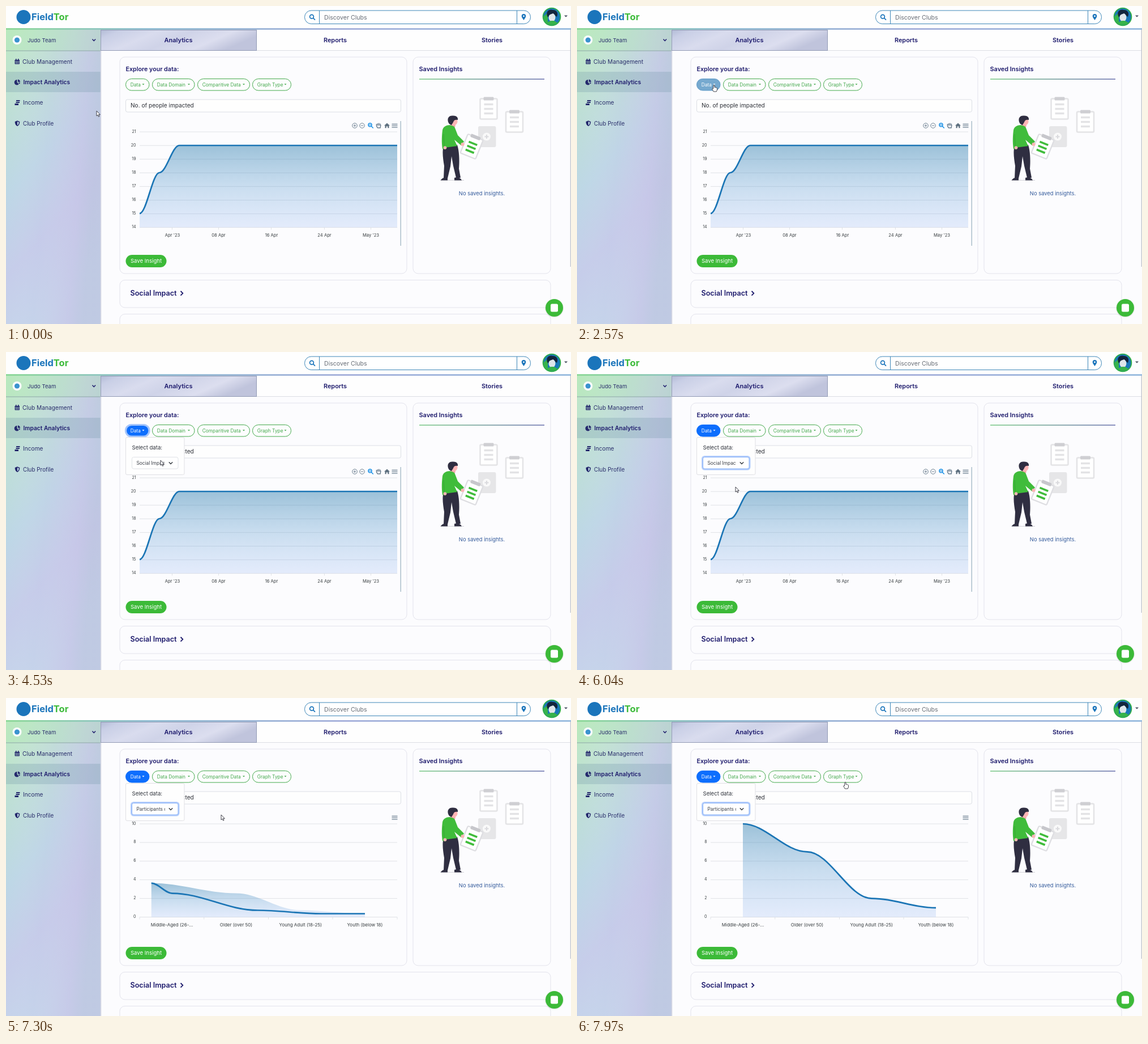
Write an HTML page that moves like this. It is 998 px wide and 561 px high and loops after 8 s.

```html
<!DOCTYPE html>
<html lang="en">
<head>
<meta charset="utf-8">
<title>Impact analytics</title>
<style>
  html, body { margin: 0; width: 100%; height: 100%; overflow: hidden; background: #fcfcfe; }
  svg { display: block; width: 998px; height: 561px; }
  text { font: 10.2px Inter, "Open Sans", sans-serif; fill: #2a2f6b; }
  .bold { font-weight: 600; fill: #1d1a6c; }
  .mid { text-anchor: middle; }
  .pill text { font-size: 8.3px; fill: #43a94b; }
  .pill rect { fill: #fdfdfe; stroke: #43a94b; }
  .pill path { fill: #43a94b; }
  .axis text { font-size: 7.6px; fill: #373d3f; }
  .axis .y { font-size: 7px; text-anchor: end; }
  .axis .cat { font-size: 8px; }
  .axis path { fill: none; stroke: #e0e2e6; }
  .card { fill: #fcfcfe; stroke: #e3e3ec; }
  .line { fill: none; stroke: #1b75b5; stroke-width: 2.7; }
  .tool { fill: none; stroke: #6e8192; }
  .on rect { stroke: none; }
  .on text { fill: #fff; }
  .on path { fill: #fff; }
</style>
</head>
<body>
<svg viewBox="0 0 998 561">
  <defs>
    <linearGradient id="bar"><stop stop-color="#8fd99a"/><stop offset=".25" stop-color="#94bfd4"/><stop offset=".6" stop-color="#a9b3dc"/><stop offset="1" stop-color="#9dbfe0"/></linearGradient>
    <linearGradient id="side" x2=".35" y2="1"><stop stop-color="#bfe9c4"/><stop offset=".2" stop-color="#bce0d0"/><stop offset=".5" stop-color="#b9d5e4"/><stop offset=".75" stop-color="#c1c9e8"/><stop offset="1" stop-color="#c0d4e9"/></linearGradient>
    <linearGradient id="sheen" x2="1" y2=".25"><stop stop-color="#fff" stop-opacity="0"/><stop offset=".5" stop-color="#d4d2ee" stop-opacity=".25"/><stop offset=".85" stop-color="#c9c6e8" stop-opacity=".7"/><stop offset="1" stop-color="#bfc3df" stop-opacity=".6"/></linearGradient>
    <linearGradient id="tab" x2="1" y2=".3"><stop stop-color="#b3bbd6"/><stop offset=".12" stop-color="#c9cfe6"/><stop offset=".35" stop-color="#d9dcee"/><stop offset=".55" stop-color="#cfd3e8"/><stop offset=".8" stop-color="#dcdeef"/><stop offset="1" stop-color="#c0c4dc"/></linearGradient>
    <linearGradient id="rule"><stop stop-color="#6cc47a"/><stop offset="1" stop-color="#5b63a5"/></linearGradient>
    <linearGradient id="area" x2="0" y2="1"><stop stop-color="#2b7cac" stop-opacity=".46"/><stop offset=".5" stop-color="#5d9cd0" stop-opacity=".32"/><stop offset="1" stop-color="#9dbcf4" stop-opacity=".26"/></linearGradient>
    <clipPath id="avatarClip"><circle cx="964" cy="19" r="14.5"/></clipPath>
    <clipPath id="optionClip"><rect x="225" y="186" width="56" height="20"/></clipPath>
    <g id="sheet">
      <rect x="-15" y="-17" width="30" height="36" rx="2" fill="#fff" stroke="#e4e4e6" stroke-width="2.6"/>
      <path d="M-8-7H8M-8 1H8M-8 9H8" stroke="#e3e3e5" stroke-width="3.4"/>
      <rect x="-9" y="-20" width="18" height="6" rx="1.5" fill="#cfcfd3"/>
    </g>
  </defs>

  <rect width="998" height="561" fill="#fcfcfe"/>

  <!-- header -->
  <rect width="998" height="39" fill="#fefefe"/>
  <circle cx="31" cy="19.5" r="12.5" fill="#1b75bb"/>
  <text x="45" y="25" style="font-size:16.5px;font-weight:700;fill:#1b75bb">Field<tspan fill="#3dbb3b">Tor</tspan></text>
  <g fill="#fff" stroke="#3c86b8">
    <rect x="527.5" y="8" width="399" height="23.5" rx="11.7"/>
    <path d="M553.5 8V31.5M902.5 8V31.5"/>
  </g>
  <g fill="none" stroke="#1b75bb" stroke-width="1.7"><circle cx="540" cy="18.7" r="3.4"/><path d="M542.5 21.2L546 24.6"/></g>
  <path d="M914.5 25C912 21.500 910.700 19.700 910.700 17.800A3.800 3.800 0 0 1 918.300 17.800C918.300 19.700 917 21.500 914.500 25Z" fill="#1b75bb"/>
  <circle cx="914.5" cy="17.800" r="1.400" fill="#fff"/>
  <text x="562" y="23.500" style="font-size:10.600px;fill:#666c75">Discover Clubs</text>
  <circle cx="964" cy="19" r="16.300" fill="#2fae45"/>
  <g clip-path="url(#avatarClip)">
    <rect x="948" y="3" width="32" height="32" fill="#1977b8"/>
    <path d="M948 20L957 12V35H948Z" fill="#37b34a"/>
    <ellipse cx="964.500" cy="20" rx="6" ry="7.500" fill="#dfe6ea"/>
    <path d="M954 35C955 28 960 26 965 26S975 29 976 35Z" fill="#37b34a"/>
    <path d="M956 18C953 8 961 5 966 7C973 7 976 13 973 19C970 18 969 14 966 13C963 15 959 14 958 20Z" fill="#14263d"/>
  </g>
  <path d="M986 16.500H992L989 19.700Z" fill="#4e5665"/>

  <!-- sidebar -->
  <rect y="42" width="167" height="519" fill="url(#side)"/>
  <rect y="42" width="167" height="519" fill="url(#sheen)"/>
  <rect y="42" width="167" height="37" fill="#a6e6a8" opacity=".25"/>
  <rect y="116" width="167" height="36" fill="#6f94a5" opacity=".27"/>
  <path d="M0 79H167" stroke="#8ea7a8"/>
  <path d="M167.500 42V561" stroke="#d5d6e3" stroke-width="1.600"/>
  <circle cx="19.500" cy="60" r="8" fill="#fff"/><circle cx="19.500" cy="60" r="4.600" fill="#3b93cf"/>
  <text x="38" y="63.500" style="font-size:9.600px">Judo Team</text>
  <path d="M152.500 58.500L155.300 61.500L158.100 58.500" fill="none" stroke="#1d1a6c" stroke-width="1.500"/>
  <g fill="#25296d">
    <path d="M15.500 95H24V101.500Q24 102.500 23 102.500H16.500Q15.500 102.500 15.500 101.500ZM17 93H18.500V95H17ZM21 93H22.500V95H21Z"/>
    <path d="M19.500 130V134.500L22.700 138A4.700 4.700 0 1 1 19.500 130ZM21 129.400A4.700 4.700 0 0 1 25 134H21ZM21.500 135H25Q24.800 136.500 23.700 137.500Z"/>
    <path d="M18 166H24.500V168H18ZM17.500 169H24V171H17.500ZM15.500 172H22V175H15.500Z"/>
    <path d="M20 202.300L24.300 204C24.300 208 23 210.500 20 212C17 210.500 15.700 208 15.700 204Z"/>
  </g>
  <path d="M15.500 97.500H24M18.300 98V102M21.200 98V102M15.500 100H24" stroke="#bde0d0" stroke-width=".6"/>
  <path d="M20 204V210.300C21.800 209.300 22.700 207.500 22.800 205Z" fill="#bcd6e3"/>
  <text x="29" y="101.500">Club Management</text>
  <text x="30.500" y="138" class="bold">Impact Analytics</text>
  <text x="30" y="174.200">Income</text>
  <text x="30" y="210.500" style="font-size:9.900px">Club Profile</text>

  <!-- tabs -->
  <rect x="443" y="42" width="555" height="36" fill="#fefefe"/>
  <path d="M443 78.500H998" stroke="#dcdde4"/>
  <rect x="167.500" y="42.500" width="275" height="36" fill="url(#tab)" stroke="#939bb5"/>
  <rect y="39" width="998" height="3" fill="url(#bar)"/>
  <g class="mid" style="font-size:11px">
    <text x="304.500" y="64" class="bold" style="font-size:11px">Analytics</text>
    <text x="581.500" y="64" class="bold" style="font-size:10.900px">Reports</text>
    <text x="858.500" y="64" class="bold" style="font-size:10.900px">Stories</text>
  </g>

  <!-- cards -->
  <rect class="card" x="201" y="90" width="507" height="382" rx="9"/>
  <rect class="card" x="719" y="90" width="243" height="382" rx="9"/>
  <rect class="card" x="201" y="483.500" width="761" height="48.500" rx="9"/>
  <rect class="card" x="201" y="543.500" width="761" height="60" rx="9"/>
  <path d="M997.300 42V460" stroke="#c5c8d0" stroke-width="1.400"/>
  <text x="211.500" y="115.400" class="bold" style="font-size:10.700px">Explore your data:</text>
  <text x="729.500" y="115.400" class="bold" style="font-size:10.900px">Saved Insights</text>
  <rect x="730" y="128.300" width="221" height="1.400" fill="url(#rule)"/>
  <text x="219.500" y="511.300" class="bold" style="font-size:12.600px">Social Impact</text>
  <path d="M308.500 503L312.300 506.800L308.500 510.600" fill="none" stroke="#1d1a6c" stroke-width="1.800"/>
  <g id="pills"></g>
  <rect x="211.500" y="165" width="486" height="22" rx="3" fill="#fefefe" stroke="#dcdfe5"/>
  <text x="220" y="179" style="fill:#2c2f36;font-size:10.100px">No. of people impacted</text>
  <rect x="211.500" y="439" width="72" height="22" rx="11" fill="#3cba38"/>
  <text x="247.500" y="453.400" class="mid" style="fill:#fff;font-size:9.600px">Save Insight</text>

  <!-- empty-state illustration -->
  <use href="#sheet" x="852.500" y="180.500"/>
  <use href="#sheet" x="898" y="203.500"/>
  <rect x="834" y="212" width="31.500" height="37" rx="3" fill="#e6e6e8"/>
  <circle cx="849" cy="230.500" r="7" fill="#fff" opacity=".75"/>
  <path d="M845.500 230.500H852.500M849 227V234" stroke="#dadade" stroke-width="2"/>
  <path d="M767 307.500H809" stroke="#d4d4da"/>
  <g fill="#2f2e41">
    <path d="M773 246L797 245C801 257 801 275 800 287L803 303H795L790 282L787 265L785 283L780 304H773L774 282C772 270 770 257 773 246Z"/>
    <path d="M768 307C770 303 775 302 780 303V307.500H768ZM792 307.500V303C798 301 803 303 805 307.500Z"/>
  </g>
  <path d="M786 203L795 205L793 214L785 213Z" fill="#f4a9ab"/>
  <circle cx="791" cy="204" r="6.500" fill="#ffb6b6"/>
  <path d="M780.500 202C780 196 784 193 789 193.500C795 193 799 196 798 201C794 200 791 201 790 205L787 210C783 209 781 206 780.500 202Z" fill="#2f2e41"/>
  <path d="M784 210C788 211 792 212 793 215L798 228L809 239L804 246L792 236L797 247L774 250L777 253L771 252C769 240 770 227 771 219C772 213 778 210 784 210Z" fill="#40bc3b"/>
  <path d="M773 226L774 247" stroke="#35a532" stroke-width="1"/>
  <circle cx="775.500" cy="250" r="2.800" fill="#ffb6b6"/>
  <g transform="translate(823 247) rotate(22)">
    <rect x="-14.500" y="-17" width="29" height="36" rx="2" fill="#fff" stroke="#dedee2" stroke-width="2.300"/>
    <path d="M-8-5H8M-8 2.500H8M-8 10H8" stroke="#40bc3b" stroke-width="3.600"/>
    <rect x="-9" y="-20" width="18" height="6" rx="1.500" fill="#c7c7cc"/>
  </g>
  <circle cx="806.500" cy="244" r="3" fill="#ffb6b6"/>
  <text x="840.500" y="333.600" class="mid" style="font-size:9.400px;fill:#335a9b">No saved insights.</text>

  <!-- charts -->
  <g id="timeChart">
    <g class="axis" id="timeAxis"></g>
    <path id="timeArea" fill="url(#area)"/>
    <path id="timeLine" class="line"/>
    <path d="M697.200 203V423" stroke="#a5b9c8" stroke-width="1.400"/>
    <g class="tool">
      <circle cx="616" cy="211" r="4.300"/><path d="M613.700 211H618.300M616 208.700V213.300"/>
      <circle cx="629" cy="211" r="4.300"/><path d="M626.700 211H631.300"/>
      <g stroke="#168fe6" stroke-width="1.500"><circle cx="643" cy="209.700" r="3"/><path d="M645.200 212L648.700 215.500M641.500 209.700H644.500"/></g>
      <path d="M654.500 212V208M656.500 211V207M658.700 211V206.500M661 211V207.500M654.500 212L656.500 215H661L662 209.500" stroke-width="1.500"/>
    </g>
    <path d="M668 211L673 206.500L678 211H676.500V215.300H674.200V212.200H671.800V215.300H669.500V211Z" fill="#5f7180"/>
  </g>
  <g id="ageChart">
    <g class="axis" id="ageAxis"></g>
    <path id="ageArea" fill="url(#area)"/>
    <path id="ageLine" class="line"/>
  </g>
  <path class="tool" d="M681.500 208.300H691.500M681.500 211.200H691.500M681.500 214.100H691.500" stroke-width="1.200"/>

  <!-- data menu -->
  <g id="menu">
    <rect x="211.500" y="150.500" width="103.500" height="66" rx="2.500" fill="#fefefe" stroke="#e0e0e4"/>
    <text x="222.500" y="171.500" style="font-size:9.600px;fill:#30343c">Select data:</text>
    <rect id="selectRing" x="221.500" y="184.500" width="83.500" height="22.500" rx="4" fill="none" stroke="#b4cdfb" stroke-width="3"/>
    <rect id="selectBox" x="222.500" y="185.500" width="81.500" height="20.500" rx="3" fill="#fff"/>
    <text id="option" x="230.500" y="198.800" clip-path="url(#optionClip)" style="font-size:8.300px;fill:#3b3f47"/>
    <path d="M287.800 194.300L291 197.500L294.200 194.300" fill="none" stroke="#343a40" stroke-width="1.400"/>
  </g>

  <circle cx="968.500" cy="533" r="16.500" fill="#000" opacity=".07"/>
  <circle cx="968.500" cy="532.500" r="15.500" fill="#3cba38"/>
  <rect x="962" y="525.500" width="13" height="14" rx="2.500" fill="#fff"/>

  <g id="cursor" stroke-linejoin="round">
    <path id="arrow" d="M0 0V9L2.100 7.200L3.500 10.300L5 9.600L3.600 6.600H6.300Z" fill="#fff" stroke="#30303a" stroke-width=".9"/>
    <path id="hand" d="M-1 1Q0-.5 1 1V4.500Q2 3.800 2.700 4.800Q3.800 4.200 4.300 5.300Q5.500 5 5.500 6.500V9Q5 10.500 4.300 12H-.8Q-2 9.500-3.500 7.500Q-3 6-1.500 7.200Z" fill="#fff" stroke="#30303a" stroke-width=".9"/>
  </g>
</svg>

<script>
const LOOP = 8000, OPEN_AT = 3050, SELECT_AT = 5150, SWAP_AT = 6970, GROW = 800;
const $ = id => document.getElementById(id);
const show = (id, on) => $(id).setAttribute('visibility', on ? 'inherit' : 'hidden');
const mix = (a, b, p) => a + (b - a) * p;
const label = (x, y, text, cls) => `<text x="${x}" y="${y}" class="${cls}">${text}</text>`;

// [text, left, width, caret centre]
const pills = [['Data', 211.5, 41.5, 242.5], ['Data Domain', 258.5, 74.5, 323],
  ['Comparitive Data', 338.5, 92, 420], ['Graph Type', 435.5, 68, 493.5]];
$('pills').innerHTML = pills.map(([text, x, w, caret]) => `<g class="pill">
  <rect x="${x}" y="128.500" width="${w}" height="20.500" rx="10.200"/>
  ${label(x + 8.3, 141.5, text, '')}
  <path d="M${caret - 2} 137.300h4l-2 2.300z"/></g>`).join('');
const dataPill = $('pills').firstElementChild, dataRect = dataPill.firstElementChild;

function drawAxis(id, values, top, step, ticks, bottom, names, nameY, cls) {
  const rows = values.map((v, i) => {
    const y = top + i * step;
    return `<path d="M236 ${y}H691"/>` + label(229.5, y + 1.5, v, 'y');
  });
  const marks = ticks.map(x => `<path d="M${x} ${bottom}v4"/>`);
  $(id).innerHTML = rows.concat(marks, names.map(([s, x]) => label(x, nameY, s, 'mid ' + cls))).join('');
}
drawAxis('timeAxis', [21, 20, 19, 18, 17, 16, 15, 14], 222, 24.1, [293.5, 375.5, 468.5, 562.5, 644.5], 390.5,
  [["Apr '23", 294], ['08 Apr', 375.5], ['16 Apr', 469], ['24 Apr', 562.5], ["May '23", 644.5]], 406.8, '');
drawAxis('ageAxis', [10, 8, 6, 4, 2, 0], 222, 32.9, [236, 349.7, 463.5, 577, 691], 386.5,
  [['Middle-Aged (26-...', 293], ['Older (over 50)', 406.5], ['Young Adult (18-25)', 520.3], ['Youth (below 18)', 634]], 402.5, 'cat');

// Smooth curve with horizontal tangents at every point
function curve(points) {
  return points.map(([x, y], i) => {
    if (!i) return `M${x} ${y}`;
    const [px, py] = points[i - 1], d = (x - px) * 0.35;
    return `C${px + d} ${py} ${x - d} ${y} ${x} ${y}`;
  }).join('');
}
function plot(prefix, linePoints, areaPoints, base) {
  $(prefix + 'Line').setAttribute('d', curve(linePoints));
  $(prefix + 'Area').setAttribute('d', `${curve(areaPoints)}V${base}H${areaPoints[0][0]}Z`);
}
const history = [[236, 366], [271, 294], [306, 246], [691, 246]];
plot('time', history, history, 390.5);

const ages = [10, 7, 2, 1], ageX = [293, 406.5, 520.3, 634], startX = [236, 229, 401, 512];
function drawAges(p) {
  const height = v => 386.5 - 16.45 * v * p;
  const line = ages.map((v, i) => [mix(startX[i], ageX[i], p), height(v)]);
  const area = ages.map((v, i) => [i ? ageX[i] : line[0][0], height(v)]);
  plot('age', [...line, [634, height(1)]], area, 386.5);
}

// Pointer stops: [ms, x, y]
const stops = [[0, 160, 185], [250, 160, 185], [1200, 356, 77], [1450, 356, 77], [2450, 242, 139],
  [3300, 242, 139], [4300, 273, 191], [5250, 273, 191], [5950, 280, 238], [6650, 280, 238],
  [7300, 380, 206], [7900, 474, 148], [LOOP, 474, 148]];
function pointerAt(t) {
  const i = stops.findIndex(s => s[0] > t), a = stops[i - 1], b = stops[i];
  const p = (t - a[0]) / (b[0] - a[0]), e = p * p * (3 - 2 * p);
  return [mix(a[1], b[1], e), mix(a[2], b[2], e)];
}
const overPill = (x, y, [, left, w]) => y >= 128 && y <= 149 && x >= left && x <= left + w;

function render(t) {
  const [x, y] = pointerAt(t);
  const hand = (x > 167 && y < 79) || pills.some(pill => overPill(x, y, pill));
  $('cursor').setAttribute('transform', `translate(${x} ${y})`);
  show('hand', hand);
  show('arrow', !hand);

  const open = t >= OPEN_AT, picked = t >= SELECT_AT, swapped = t >= SWAP_AT;
  const hover = overPill(x, y, pills[0]);
  dataPill.classList.toggle('on', open || hover);
  dataRect.style.fill = open ? '#0d6efd' : hover ? '#76a9cf' : '';
  dataRect.style.stroke = open && !picked ? '#a3c4fb' : hover && !open ? '#5f9ac7' : open ? '#0d6efd' : '';
  dataRect.style.strokeWidth = open && !picked ? 3.2 : 1;

  show('menu', open);
  show('selectRing', open && picked);
  $('selectBox').setAttribute('stroke', picked ? '#86b0f7' : '#dfe2e7');
  $('option').textContent = swapped ? 'Participants over time' : 'Social Impact';
  show('timeChart', !swapped);
  show('ageChart', swapped);
  if (swapped) drawAges((1 - Math.cos(Math.PI * Math.min(1, (t - SWAP_AT) / GROW))) / 2);
}

let start;
function tick(now) {
  start ??= now;
  render(Math.max(0, now - start) % LOOP);
  requestAnimationFrame(tick);
}
render(0);
requestAnimationFrame(tick);
</script>
</body>
</html>
```
